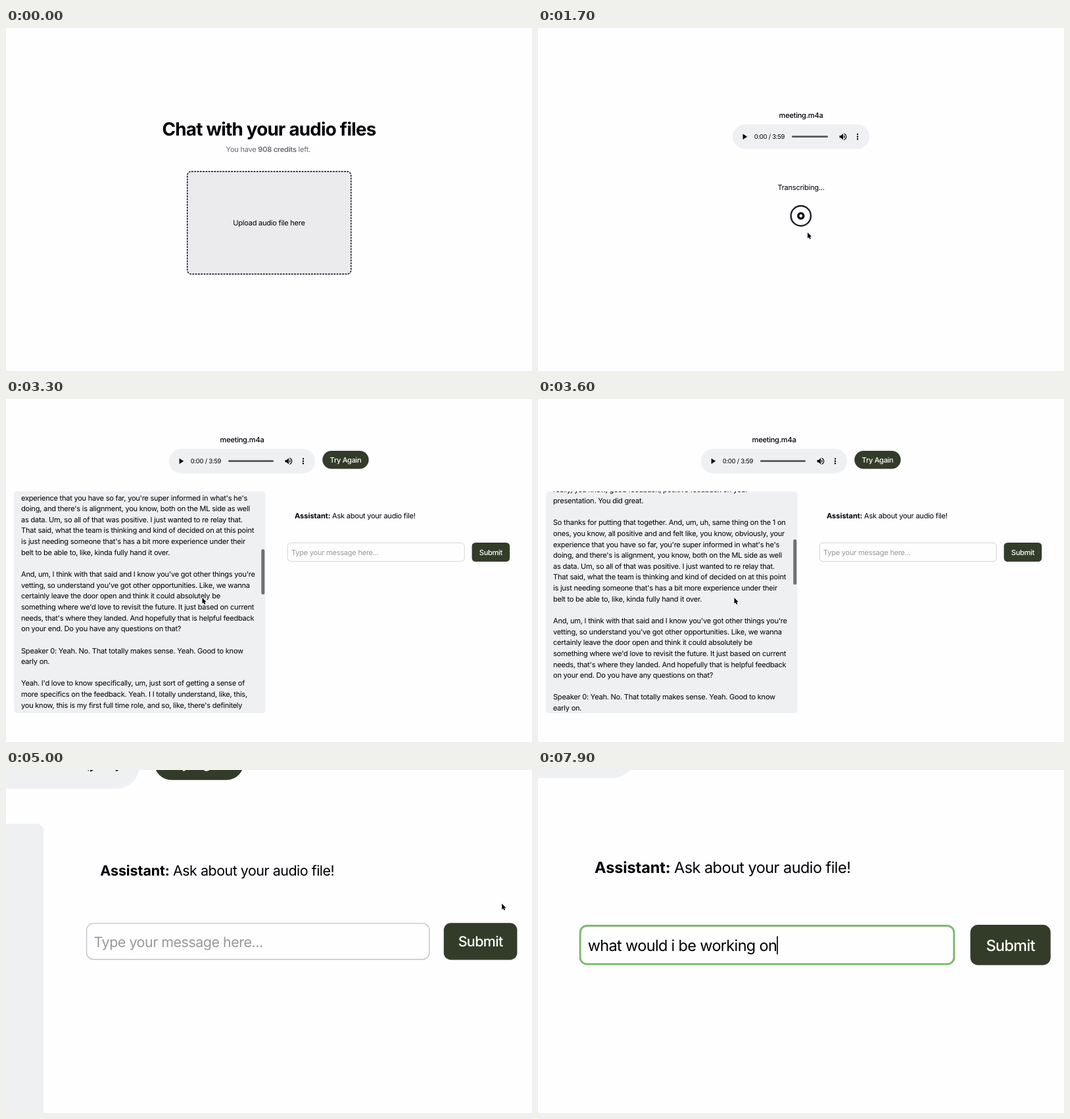
Write an HTML page with a canvas that moves like this. It is 800x523 px and loops after 8 s.

```html
<!DOCTYPE html>
<html lang="en">
<head>
<meta charset="utf-8">
<title>Chat with your audio files</title>
<style>
html, body { margin: 0; width: 100%; height: 100%; overflow: hidden; background: #fefdff; }
canvas { display: block; width: 800px; height: 523px; }
</style>
</head>
<body>
<canvas></canvas>
<script>
const W = 800, H = 523, LOOP = 8000, STEP = 100;
const BODY = 11.09, LINE = 16.64;
const BG = '#fefdff', PALE = '#eef0f2', OLIVE = '#333c29';
const PANEL = { x: 12, y: 141, w: 382.5, h: 338 };
const REST = { x: 754.2, y: 203.8 };
const QUERY = 'what would i be working on';
const TRANSCRIPT = `Speaker 1: Hey.

Speaker 0: Hi. How are you doing?

Speaker 1: Good. I'm doing well. How is everything
going with you?

Speaker 0: Good. Thank you.

Speaker 1: Good. Thanks for giving me a callback.

Speaker 0: Yes. Of course.

Speaker 1: Um, Yeah. I wanted to catch you up just because we didn't
have a chance to debrief, oh, man. Sorry. I'm outside. So it's gonna be
some background noise, I think.

Oh, you're good. Okay. Um, Yeah. We had a chance to actually sync up
as a team yesterday, and, um, you know, overall, everyone had really,
really, you know, good feedback, positive feedback on your
presentation. You did great.

So thanks for putting that together. And, um, uh, same thing on the 1 on
ones, you know, all positive and and felt like, you know, obviously, your
experience that you have so far, you're super informed in what's he's
doing, and there's is alignment, you know, both on the ML side as well
as data. Um, so all of that was positive. I just wanted to re relay that.
That said, what the team is thinking and kind of decided on at this point
is just needing someone that's has a bit more experience under their
belt to be able to, like, kinda fully hand it over.

And, um, I think with that said and I know you've got other things you're
vetting, so understand you've got other opportunities. Like, we wanna
certainly leave the door open and think it could absolutely be
something where we'd love to revisit the future. It just based on current
needs, that's where they landed. And hopefully that is helpful feedback
on your end. Do you have any questions on that?

Speaker 0: Yeah. No. That totally makes sense. Yeah. Good to know
early on.

Yeah. I'd love to know specifically, um, just sort of getting a sense of
more specifics on the feedback. Yeah. I I totally understand, like, this,
you know, this is my first full time role, and so, like, there's definitely`.split('\n');

const ICONS = {
  play: new Path2D('M8 5v14l11-7z'),
  volume: new Path2D('M3 9v6h4l5 5V4L7 9H3zm13.5 3c0-1.77-1.02-3.29-2.5-4.03v8.05c1.48-.73 2.5-2.25 2.5-4.02z' +
    'M14 3.23v2.06c2.89.86 5 3.54 5 6.71s-2.11 5.85-5 6.71v2.06c4.01-.91 7-4.49 7-8.77s-2.99-7.86-7-8.77z'),
  menu: new Path2D('M10 6a2 2 0 1 0 4 0a2 2 0 1 0-4 0M10 12a2 2 0 1 0 4 0a2 2 0 1 0-4 0M10 18a2 2 0 1 0 4 0a2 2 0 1 0-4 0')
};
const ARROW = new Path2D('M0 0V9L2 7.2L3.3 10.2L4.9 9.5L3.6 6.6H6.3Z');
const IBEAM = new Path2D('M-2-4.5Q0-4.5 0-3V3Q0 4.5-2 4.5M2-4.5Q0-4.5 0-3M0 3Q0 4.5 2 4.5');

const canvas = document.querySelector('canvas');
const ctx = canvas.getContext('2d');
const dpr = window.devicePixelRatio || 1;
canvas.width = W * dpr;
canvas.height = H * dpr;

// Eased value between [time, value] keys.
function track(t, keys) {
  if (t <= keys[0][0]) return keys[0][1];
  for (let i = 1; i < keys.length; i++) {
    const [t0, a] = keys[i - 1], [t1, b] = keys[i];
    if (t < t1) {
      const u = (t - t0) / (t1 - t0);
      return a + (b - a) * u * u * (3 - 2 * u);
    }
  }
  return keys[keys.length - 1][1];
}

// Draws text whose capitals are centred on y; returns its width.
function text(str, x, y, { size = BODY, weight = 400, color = '#000', align = 'left', spacing = -0.023 } = {}) {
  ctx.font = `${weight} ${size}px Inter, sans-serif`;
  ctx.letterSpacing = `${size * spacing}px`;
  ctx.textRendering = 'geometricPrecision';
  ctx.textAlign = align;
  ctx.fillStyle = color;
  ctx.fillText(str, x, y + size * 0.36);
  return ctx.measureText(str).width;
}

function box(x, y, w, h, r, fill, stroke, line = 1) {
  const inset = stroke ? line / 2 : 0;
  ctx.beginPath();
  ctx.roundRect(x + inset, y + inset, w - 2 * inset, h - 2 * inset, Math.max(0, r - inset));
  if (fill) { ctx.fillStyle = fill; ctx.fill(); }
  if (stroke) { ctx.strokeStyle = stroke; ctx.lineWidth = line; ctx.stroke(); }
}

function button(label, x, y, w, h, r) {
  box(x, y, w, h, r, OLIVE);
  text(label, x + w / 2, y + h / 2 + 0.2, { weight: 500, color: '#fff', align: 'center', spacing: -0.03 });
}

function icon(path, x, y) {
  ctx.save();
  ctx.translate(x, y);
  ctx.scale(0.6, 0.6);
  ctx.translate(-12, -12);
  ctx.fillStyle = '#000';
  ctx.fill(path);
  ctx.restore();
}

function player(x, y, w) {
  const mid = y + 18.7;
  text('meeting.m4a', x + w / 2, y - 14, { weight: 500, align: 'center' });
  box(x, y, w, 37.4, 18.7, PALE);
  icon(ICONS.play, x + 18, mid);
  text('0:00 / 3:59', x + 32.7, mid + 0.2, { size: 9.5, spacing: -0.03 });
  box(x + 90, mid - 1.4, w - 153, 2.8, 1.4, '#55565a');
  icon(ICONS.volume, x + w - 40, mid);
  icon(ICONS.menu, x + w - 18, mid);
}

function uploadScreen() {
  text('Chat with your audio files', 400, 153.5, { size: 27.8, weight: 700, align: 'center', spacing: -0.028 });
  const gray = { color: '#6d6d71' };
  let x = 334.5;
  x += text('You have ', x, 184.7, gray);
  x += text('908 credits', x, 184.7, { ...gray, weight: 600 });
  text(' left.', x, 184.7, gray);
  ctx.setLineDash([2.8, 1.5]);
  box(275, 218, 250.5, 158, 7, '#ebeaec', '#000', 1.4);
  ctx.setLineDash([]);
  text('Upload audio file here', 400, 297, { align: 'center' });
}

function transcribingScreen(t) {
  player(296, 147, 208);
  text('Transcribing...', 400, 243, { align: 'center' });
  for (const offset of [0, 0.5]) {
    const p = ((t + 262) / 1800 + offset) % 1;
    ctx.globalAlpha = 1 - p ** 4;
    ctx.strokeStyle = '#000';
    ctx.lineWidth = 3.4 - 1.7 * p;
    ctx.beginPath();
    ctx.arc(399.8, 286.5, 16.3 * (1 - (1 - p) ** 3), 0, 2 * Math.PI);
    ctx.stroke();
  }
  ctx.globalAlpha = 1;
}

function transcriptPanel(t) {
  const scroll = track(t, [[2600, 0], [3300, 409.5], [3800, 300], [3900, 300], [4100, 158], [4500, 0]]);
  const { x, y, w, h } = PANEL;
  ctx.save();
  box(x, y, w, h, 5, PALE);
  ctx.clip();
  TRANSCRIPT.forEach((line, i) => {
    const lineY = y + 19.7 + i * LINE - scroll;
    if (lineY > y - 10 && lineY < y + h + 10) text(line, 23, lineY);
  });
  ctx.globalAlpha = track(t, [[2600, 0], [2700, 1], [4500, 1], [4700, 0]]);
  box(388.3, y + 1.6 + scroll / 4.745, 5, 69, 2.5, '#6e7073');
  ctx.restore();
}

function chatScreen(t, typed) {
  player(248, 76, 222);
  button('Try Again', 481.3, 79, 70.4, 27.5, 13.75);
  transcriptPanel(t);

  const nameWidth = text('Assistant: ', 439, 177.6, { weight: 700, spacing: -0.004 });
  text('Ask about your audio file!', 439 + nameWidth, 177.6);

  const focused = t >= 5700;
  box(428, 219, 269.6, 29, 5.6, '#fefeff', focused ? '#7fbb69' : '#c3c3c8', focused ? 1.4 : 0.7);
  if (!typed) text('Type your message here...', 434, 233.8, { color: '#98989d' });
  const width = text(typed, 434.2, 233.8, { spacing: -0.028 });
  if (focused) box(434.2 + width, 227.2, 0.8, 13, 0, '#000');
  button('Submit', 708.6, 219, 57.6, 29, 5.5);
}

function suggestion() {
  const dark = '#1b1b1d';
  ctx.save();
  ctx.shadowColor = 'rgba(0,0,0,.35)';
  ctx.shadowBlur = 4;
  ctx.shadowOffsetY = 1;
  box(131, 304, 175, 30, 4, dark);
  ctx.restore();
  ctx.fillStyle = dark;
  ctx.fill(new Path2D('M138.5 304.5L145 298L151.5 304.5Z'));
  text('what did noah say about my...', 139.5, 319.5, { size: 9.1, weight: 600, color: '#f0f0f0', spacing: 0 });
}

function pointer(t) {
  const x = track(t, [[2350, 410], [2600, 298.5], [4300, 298.5], [4700, REST.x], [5300, REST.x], [5600, 300]]);
  const y = track(t, [[2350, 311.7], [2600, 303], [4300, 303], [4700, REST.y], [5300, REST.y], [5600, 268]]);
  const overText = (t > 3900 && x < 382) || (t > 5300 && x < 634 && y > 236);
  ctx.save();
  ctx.translate(x, y);
  ctx.lineJoin = 'round';
  ctx.strokeStyle = '#fff';
  ctx.lineWidth = overText ? 2 : 1.6;
  ctx.stroke(overText ? IBEAM : ARROW);
  ctx.fillStyle = ctx.strokeStyle = '#000';
  ctx.lineWidth = 0.8;
  if (overText) ctx.stroke(IBEAM); else ctx.fill(ARROW);
  ctx.restore();
}

function typedCount(t) {
  const n = t < 6600 ? 2 + (t - 5900) / 135 : 7 + (t - 6600) / 68;
  return Math.max(0, Math.min(QUERY.length, Math.floor(n)));
}

function draw(t) {
  const count = typedCount(t);
  ctx.setTransform(dpr, 0, 0, dpr, 0, 0);
  ctx.fillStyle = BG;
  ctx.fillRect(0, 0, W, H);
  if (t < 100) return uploadScreen();

  if (t < 2300) {
    transcribingScreen(t);
  } else {
    // Pinch zoom around the resting pointer.
    const u = Math.max(0, Math.min(1, (t - 4800) / 440));
    const zoom = 1 + 1.12 * (1 - (1 - u) ** 3);
    ctx.save();
    ctx.translate(REST.x, REST.y);
    ctx.scale(zoom, zoom);
    ctx.translate(-REST.x, -REST.y);
    chatScreen(t, QUERY.slice(0, count));
    ctx.restore();
  }
  if (count > 0 && count < 6) suggestion();
  if (count === 0) pointer(t);
}

function frame() {
  const t = performance.now() % LOOP;
  draw(Math.floor(t / STEP) * STEP);
  requestAnimationFrame(frame);
}
frame();
</script>
</body>
</html>
```
